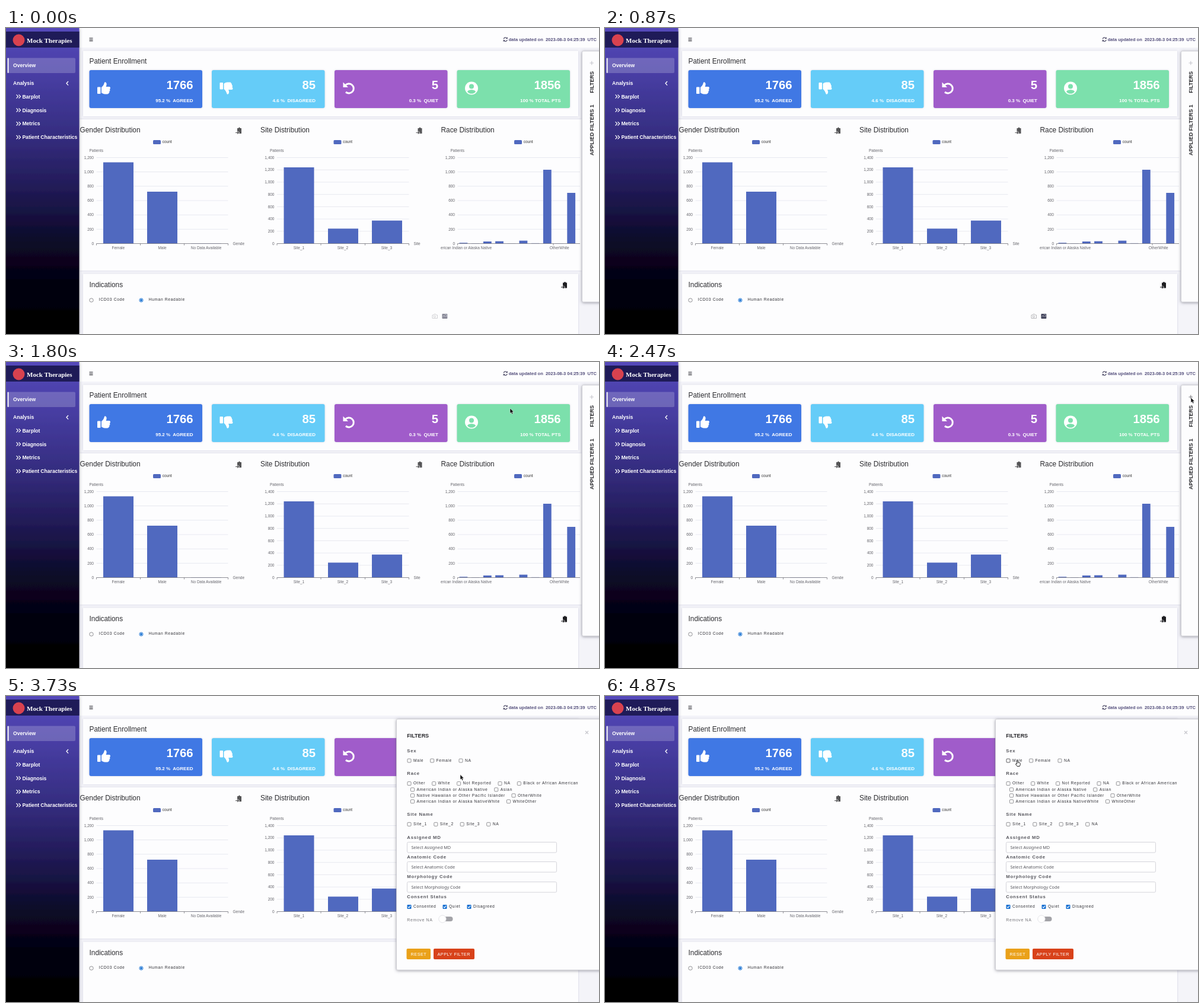
An HTML page that plays this animation: 1000 by 516 pixels, repeating every 4990 ms.

```html
<!DOCTYPE html>
<html lang="en">
<head>
<meta charset="utf-8">
<title>Patient dashboard</title>
<style>
html, body { margin: 0; width: 100%; height: 100%; overflow: hidden; background: #fdfdfe; }
svg { display: block; width: 1000px; height: 516px; font-family: "Liberation Sans", Arial, sans-serif; }
.b { font-weight: bold; }
.title { font-size: 11.85px; fill: #2c2c30; }
.nav { font-size: 8.58px; font-weight: bold; fill: #fff; }
.num { font-size: 20.3px; font-weight: bold; text-anchor: end; }
.sub { font-size: 8px; font-weight: bold; text-anchor: end; }
.axis { font-size: 6.5px; fill: #66666c; }
.opt { font-size: 6.7px; letter-spacing: .67px; fill: #333338; }
.sec { font-size: 7.7px; font-weight: bold; letter-spacing: .78px; fill: #55555c; }
.hint { font: 7.25px "Noto Sans", "Open Sans", sans-serif; fill: #55555c; }
.btn { font-size: 7.3px; letter-spacing: .5px; fill: #fff; }
.tab { font-size: 9px; font-weight: bold; fill: #26262a; }
.brand { font: bold 11px "Liberation Serif", "Times New Roman", serif; fill: #fff; }
.end { text-anchor: end; }
.mid { text-anchor: middle; }
</style>
</head>
<body>
<svg id="stage" viewBox="0 0 1000 516"></svg>
<script>
const LOOP = 4990, BLUE = '#5069bf', GREEN = '#7be0ac', PAPER = '#fdfdfe', GAP = '#f4f4f9';

const text = (x, y, s, cls, extra = '') =>
  `<text x="${x}" y="${y}" class="${cls}" ${extra}>${s.replace(/  /g, '\u00a0 ')}</text>`;
const rect = (x, y, w, h, fill, extra = '') =>
  `<rect x="${x}" y="${y}" width="${w}" height="${h}" fill="${fill}" ${extra}/>`;
const line = (d, color, width = 1, extra = '') =>
  `<path d="${d}" fill="none" stroke="${color}" stroke-width="${width}" ${extra}/>`;
const at = (x, y, body, extra = '') => `<g transform="translate(${x} ${y}) ${extra}">${body}</g>`;

const THUMB = `<rect x="-11" y="-2" width="5.5" height="11.5" rx="1"/>
  <path d="M-4-1.5C-1-4 0-6 1-9.5C1.6-11 5-10 4.6-6C4.4-4.6 4-3.5 3.6-2.6H9C11.5-2.4 11.5 1 9.8 1.6
  C11 3 10.5 5 9.2 5.4C9.8 7 9 8.2 8 8.6C8 9.6 7 10 6 10H2C-1 10-2.5 8.5-4 7.8Z"/>`;
const UNDO = `<path d="M-6.5-4.5A8 8 0 1 1-5.5 6.5" fill="none" stroke="#fff" stroke-width="3"/>
  <path d="M-10-10V-1.5H-1.5Z"/>`;
const USER = `<circle r="11"/><g fill="${GREEN}"><circle cy="-3" r="4"/><path d="M-7 6C-6 1.5 6 1.5 7 6A9 9 0 0 1-7 6Z"/></g>`;
const CLIP = `<path d="M-2-4H0A1.5 1.5 0 0 1 3-4H5V5H-2Z" fill="#1d1d20"/>
  <path d="M-5 3.5H0M-1.8 1.5L.3 3.5L-1.8 5.5" fill="none" stroke="${PAPER}" stroke-width="2.4"/>
  <path d="M-5 3.5H0M-1.8 1.5L.3 3.5L-1.8 5.5" fill="none" stroke="#1d1d20" stroke-width="1.2"/>`;

function card(x, fill, icon, flip, value, note) {
  return rect(x, 71, 190.5, 64, fill, 'rx="3" filter="url(#glow)"') +
    '<g fill="#fff">' + at(x + 24.5, 101.5, icon, flip) +
    text(x + 175, 103.3, value, 'num') + text(x + 175, 124.6, note, 'sub') + '</g>';
}

function chart(o) {
  const base = 363.5, step = 145 / (o.max / 200);
  let s = text(o.title[1], 176.3, o.title[0], 'title');
  s += rect(o.left + 95.5, 189, 13, 7, BLUE, 'rx="1.5"') + text(o.left + 111.2, 194.3, 'count', 'axis', 'style="fill:#333"');
  s += text(o.left - 12, 209, 'Patients', 'axis');
  for (let v = 0; v <= o.max; v += 200) {
    const y = base - v / 200 * step;
    s += text(o.left - 4.5, y + 2.2, v.toLocaleString('en-US'), 'axis end');
    if (v) s += line(`M${o.left} ${y}H${o.right}`, '#e2e4ec', .8);
  }
  for (const [x, w, top] of o.bars) s += rect(x, top, w, base - top, BLUE);
  s += line(`M${o.left} ${base}H${o.right}` + o.ticks.map(x => `M${x} ${base}v3`).join(''), '#74747c', .8);
  for (const [x, label] of o.labels) s += text(x, 372.7, label, 'axis mid');
  if (o.name) s += text(o.right + 8, 365.5, o.name, 'axis');
  return s;
}

function box(x, y, label, on, id = '') {
  const mark = on
    ? rect(x - 3.5, y - 3.5, 7, 7, '#1670d2', 'rx="1"') + line(`M${x - 2} ${y}l1.5 1.6l2.6-3.4`, '#fff', 1.1)
    : rect(x - 3, y - 3, 6, 6, '#fff', `rx="1" stroke="#77777c" stroke-width=".8" ${id}`);
  return mark + text(x + 7, y + 1.8, label, 'opt');
}

function page() {
  const sheet = (x, y, w, h) => rect(x, y, w, h, PAPER, 'filter="url(#glow)"');
  let s = rect(124, 0, 876, 516, GAP);
  s += rect(124, 0, 876, 33, PAPER) + sheet(130, 38.5, 835, 110.5) + sheet(124, 154, 847, 255) + sheet(130, 414.5, 835, 110);
  s += line('M140.5 17h6M140.5 19.3h6M140.5 21.6h6', '#3a3a40', 1.1);
  s += line('M839.2 18.5a3 3 0 0 1 5.4-1.2M845.2 20a3 3 0 0 1-5.4 1.2', '#45425f', 1.2) +
    '<path d="M845.8 15.3v3h-3zM838.6 23.2v-3h3z" fill="#45425f"/>';
  s += text(996, 22, 'data updated on  2023-08-3 04:25:39  UTC', 'b end', 'font-size="7.52" fill="#544f7c"');

  s += text(140.5, 60.3, 'Patient Enrollment', 'title');
  s += card(140.5, '#4078e4', THUMB, '', '1766', '95.2 %  AGREED');
  s += card(347, '#65ccf8', THUMB, 'scale(1 -1)', '85', '4.6 %  DISAGREED');
  s += card(554, '#a05cca', UNDO, '', '5', '0.3 %  QUIET');
  s += card(760.5, GREEN, USER, '', '1856', '100 % TOTAL PTS');

  s += chart({ title: ['Gender Distribution', 124.5], left: 152.5, right: 374.5, max: 1200,
    bars: [[164, 51, 226.5], [238, 51, 276], [312, 51, 363]], ticks: [152.5, 226.5, 300.5, 374.5],
    labels: [[189.3, 'Female'], [263.5, 'Male'], [337.6, 'No Data Available']], name: 'Gende' });
  s += chart({ title: ['Site Distribution', 429], left: 457, right: 679.5, max: 1400,
    bars: [[468.5, 51, 235], [543, 51, 338.3], [617, 51, 324.7]], ticks: [457, 531, 605.5, 679.5],
    labels: [[494, 'Site_1'], [568, 'Site_2'], [642, 'Site_3']], name: 'Site' });
  const tops = [362.2, 363, 360, 359.6, 363.2, 358.6, 362.9, 239, 363.2, 278];
  s += chart({ title: ['Race Distribution', 733.5], left: 761.5, right: 968, max: 1200,
    bars: tops.map((t, i) => [764.5 + 20.2 * i, 13.8, t]), ticks: [761.5, 923],
    labels: [[776, 'erican Indian or Alaska Native'], [933.2, 'OtherWhite']] });
  s += `<g opacity=".75">${at(392, 173, CLIP)}${at(696.5, 173, CLIP)}</g>`;

  s += text(140.5, 436.8, 'Indications', 'title') + at(941, 433.5, CLIP);
  s += '<circle cx="144" cy="459" r="3.2" fill="#fff" stroke="#77777c" stroke-width=".8"/>' + text(156.8, 460.3, 'ICD03 Code', 'opt');
  s += '<circle cx="228" cy="459" r="3.1" fill="#fff" stroke="#1670d2" stroke-width=".9"/><circle cx="228" cy="459" r="1.9" fill="#1670d2"/>' +
    text(240.4, 460.3, 'Human Readable', 'opt');
  s += `<g id="tools"><g opacity=".42">${line('M719 484h2l1-1.5h2.5l1 1.5h2v5.5h-8.5z', '#55555c', 1)}
    <circle cx="723" cy="486.5" r="1.6" fill="none" stroke="#55555c"/></g>
    ${rect(735.5, 482, 8.8, 8, '#2e3048', 'rx=".8"')}${line('M737 488v-2M739 488v-3M741 488v-2.5M743 488v-4M736.5 484l2 .6 2-1.2 3 .2', '#c9cad8', .8)}</g>`;
  return s;
}

function sidebar() {
  let s = rect(0, 0, 123.5, 516, 'url(#side)', 'filter="url(#shade)"');
  s += rect(0, 6, 123.5, 27, '#1f1b58') + '<circle cx="21.5" cy="20.5" r="10" fill="#d8424f"/>' +
    text(35, 25, 'Mock Therapies', 'brand');
  s += rect(3, 50.5, 114, 25.5, '#fff', 'opacity=".2" rx="2"') + rect(2.5, 50.5, 2, 25.5, '#fff', 'rx="1"');
  s += text(12, 65.5, 'Overview', 'nav') + text(12, 96.2, 'Analysis', 'nav') + line('M105 90l-3 3.3l3 3.3', '#fff', 1.3);
  [['Barplot', 115.5], ['Diagnosis', 138.5], ['Metrics', 161.3], ['Patient Characteristics', 184.2]].forEach(([name, y]) => {
    s += line(`M17.5 ${y - 3.2}l3 3.2l-3 3.2M21.5 ${y - 3.2}l3 3.2l-3 3.2`, '#fff', 1.2) + text(27.4, y + 3, name, 'nav');
  });
  return s;
}

function panel() {
  let s = rect(658.5, 39, 350, 423, PAPER, 'rx="2" stroke="#c8c8ce" stroke-width=".8" filter="url(#shade)"');
  s += `<g id="tab">${line('M671.5 59h6.5M674.8 55.8v6.5', '#c4c4cc', 1.1, 'id="plus"')}
    ${text(0, 0, 'FILTERS', 'tab', 'transform="translate(677.7 109.8) rotate(-90)"')}
    ${text(0, 0, 'APPLIED FILTERS 1', 'tab', 'transform="translate(677.7 215) rotate(-90)"')}</g>`;
  s += '<g id="form">' + text(676.3, 70.4, 'FILTERS', 'tab') + line('M977 59l5 5M982 59l-5 5', '#c6c6cc', 1.2);
  [['Sex', 94.5], ['Race', 133.3], ['Site Name', 202], ['Assigned MD', 240.8], ['Anatomic Code', 274],
   ['Morphology Code', 307.2], ['Consent Status', 341]].forEach(([name, y]) => s += text(676.3, y, name, 'sec'));
  s += box(680, 109, 'Male', false, 'id="male"') + box(718.6, 109, 'Female') + box(767, 109, 'NA');
  s += box(680, 147.6, 'Other') + box(721.6, 147.6, 'White') + box(763.6, 147.6, 'Not Reported') +
    box(833, 147.6, 'NA') + box(865.3, 147.6, 'Black or African American');
  s += box(685.5, 157.8, 'American Indian or Alaska Native') + box(826.7, 157.8, 'Asian');
  s += box(685.5, 167.8, 'Native Hawaiian or Other Pacific Islander') + box(856, 167.8, 'OtherWhite');
  s += box(685.5, 177.8, 'American Indian or Alaska NativeWhite') + box(847.5, 177.8, 'WhiteOther');
  s += box(680, 216.3, 'Site_1') + box(724.8, 216.3, 'Site_2') + box(769.2, 216.3, 'Site_3') + box(813.7, 216.3, 'NA');
  [['Assigned MD', 246.5], ['Anatomic Code', 279.5], ['Morphology Code', 313.5]].forEach(([name, y]) =>
    s += rect(676.5, y, 252, 17.5, '#fff', 'rx="2" stroke="#d0d0d6" stroke-width=".9"') + text(683.4, y + 11.2, 'Select ' + name, 'hint'));
  s += box(680, 355.5, 'Consented', true) + box(740, 355.5, 'Quiet', true) + box(781, 355.5, 'Disagreed', true);
  s += text(676.3, 379.8, 'Remove NA', '', 'font-size="7" letter-spacing=".6" fill="#77777c"');
  s += rect(732, 372, 21.5, 8, '#a3a3a8', 'rx="4"') + '<circle cx="736" cy="376" r="6.2" fill="#fff" stroke="#dedee2" stroke-width=".8"/>';
  s += rect(675.5, 426, 40.5, 18, '#eaa11a', 'rx="2"') + text(682.5, 437.7, 'RESET', 'btn');
  s += rect(721, 426, 69, 18, '#d8421a', 'rx="2"') + text(727.5, 437.7, 'APPLY FILTER', 'btn');
  return s + '</g>';
}

const stop = (at, color) => `<stop offset="${at}" stop-color="${color}"/>`;
const shadow = (id, dy, blur, color, alpha) => `<filter id="${id}" x="-10%" y="-12%" width="120%" height="124%">
  <feDropShadow dx="0" dy="${dy}" stdDeviation="${blur}" flood-color="${color}" flood-opacity="${alpha}"/></filter>`;
const stage = document.getElementById('stage');
stage.innerHTML = `<defs>
  <linearGradient id="side" x1="0" y1="0" x2="0" y2="1">${stop(0, '#5549ba')}${stop(.15, '#483ea4')}${stop(.35, '#352d80')}${
    stop(.5, '#241d5c')}${stop(.7, '#0b0828')}${stop(.85, '#03020c')}${stop(1, '#000')}</linearGradient>
  ${shadow('glow', 0, 1.6, '#8c8ca8', .35)}${shadow('shade', 1, 2.5, '#4c4c60', .55)}
  </defs>${page()}<g id="panel">${panel()}</g>${sidebar()}
  <g id="cursor">
    <path id="arrow" d="M0 0V8.6L2 6.9L3.4 10L5 9.3L3.6 6.3H6.2Z" fill="#0c0c0e" stroke="#fff" stroke-width=".5"/>
    <path id="hand" d="M-.9 .7Q0-.6 .9 .7V3.6L4 4.3Q5 4.6 4.9 6L4.4 8.3L3.7 10H-.5L-3 6.8Q-3.2 5.5-1.8 5.7L-.9 6.4Z" fill="#fff" stroke="#0c0c0e" stroke-width=".9"/>
  </g>`;

const ids = ['tools', 'panel', 'tab', 'plus', 'form', 'male', 'cursor', 'arrow', 'hand'];
const parts = Object.fromEntries(ids.map(id => [id, document.getElementById(id)]));

// Rows hold a time in ms followed by values.
const PATH = [[0, 668, 560], [930, 668, 560], [1070, 640, 430], [1330, 594.5, 129], [1600, 690, 104], [1800, 850, 78],
  [2070, 984, 62], [2200, 984, 62], [2470, 988, 60], [2950, 988, 60], [3150, 900, 92], [3400, 766, 132.5],
  [3730, 766, 132.5], [4200, 733, 124], [4270, 731, 123], [4730, 695.5, 108.5], [4990, 695.5, 108.5]];
const TOOLS = [[0, .62], [200, 1], [1030, 1], [1250, 0], [4990, 0]];
const OPEN = 2760;
const SLIDE = [[0, 313], [OPEN, 313], [3080, 0], [4990, 0]];

function sample(rows, t) {
  const i = Math.max(1, rows.findIndex(r => r[0] > t));
  const a = rows[i - 1], b = rows[i], k = (t - a[0]) / (b[0] - a[0]), e = k * k * (3 - 2 * k);
  return a.slice(1).map((v, n) => v + (b[n + 1] - v) * e);
}
const show = (node, on) => node.setAttribute('visibility', on ? 'visible' : 'hidden');

function draw(t) {
  const [x, y] = sample(PATH, t), [shift] = sample(SLIDE, t);
  const open = t >= OPEN, point = open && y < 113 && x < 706;
  parts.tools.setAttribute('opacity', sample(TOOLS, t)[0]);
  parts.panel.setAttribute('transform', `translate(${shift} 0)`);
  show(parts.tab, !open);
  show(parts.form, open);
  parts.plus.setAttribute('stroke', t > 2040 ? '#77777c' : '#c4c4cc');
  parts.male.setAttribute('stroke', point ? '#333338' : '#77777c');
  parts.cursor.setAttribute('transform', `translate(${x} ${y})`);
  show(parts.arrow, !point);
  show(parts.hand, point);
}

const start = performance.now();
function tick() {
  draw((performance.now() - start) % LOOP);
  requestAnimationFrame(tick);
}
tick();
</script>
</body>
</html>
```
